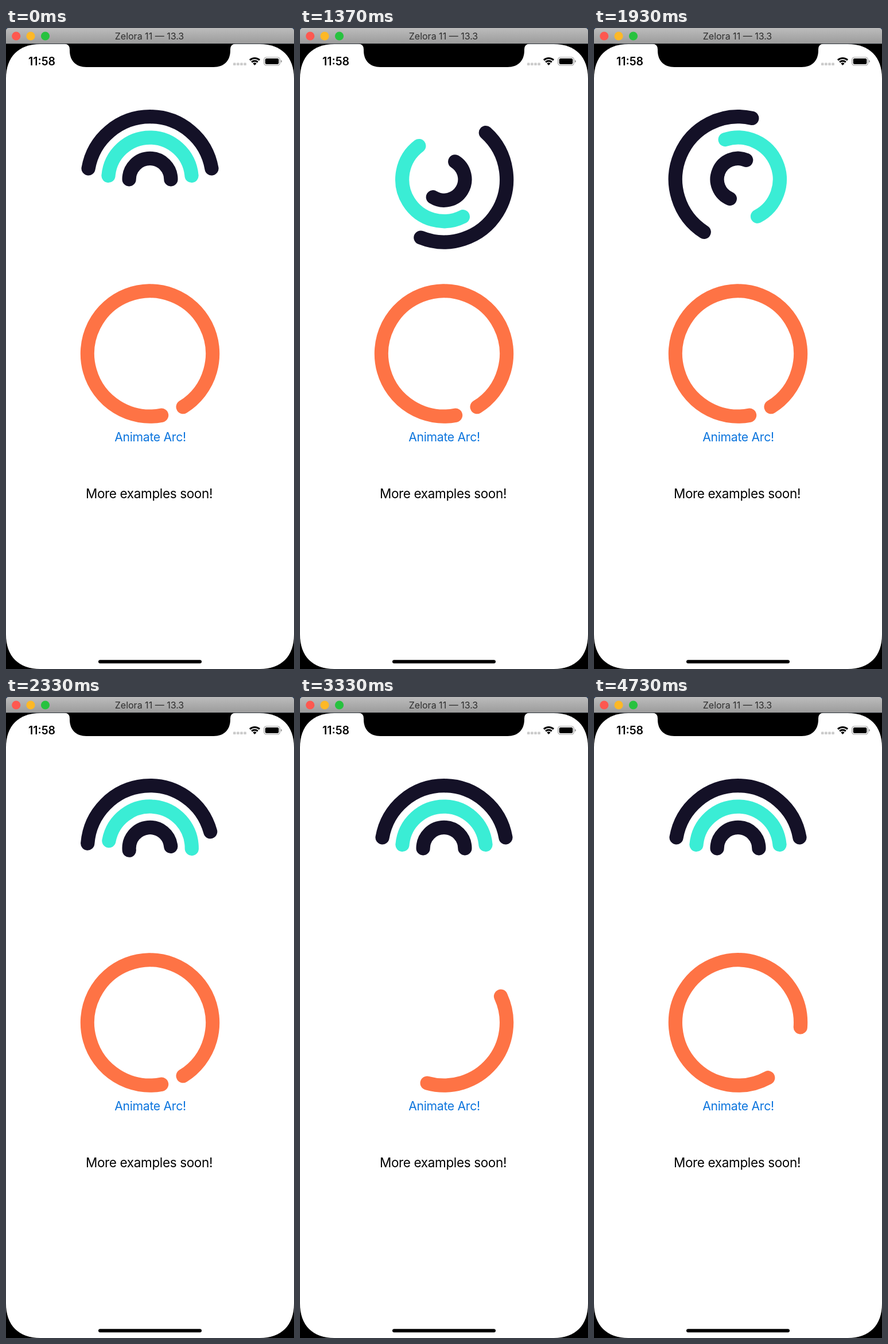
An HTML page for the animation above (4.76 s loop, 502 px wide and 1115 px high).

```html
<!DOCTYPE html>
<html lang="en">
<head>
<meta charset="utf-8">
<title>Arc examples</title>
<style>
  html, body { margin: 0; width: 100%; height: 100%; overflow: hidden; background: #000; }
  svg { display: block; width: 100%; height: 100%; }
  text { font-family: Inter, Roboto, sans-serif; text-anchor: middle; }
  .arc { fill: none; stroke-width: 24.25; stroke-linecap: round; }
</style>
</head>
<body>
<svg viewBox="0 0 502 1115">
  <defs>
    <linearGradient id="bar" x2="0" y2="1">
      <stop offset="0" stop-color="#bcbcbc"/>
      <stop offset="1" stop-color="#9b9b9b"/>
    </linearGradient>
  </defs>

  <!-- window bar -->
  <rect width="502" height="28" fill="#1d3557"/>
  <path d="M0 27.5V5Q0 0 5 0H497Q502 0 502 5V27.5Z" fill="url(#bar)"/>
  <circle cx="17.7" cy="14" r="7.6" fill="#fe5850"/>
  <circle cx="43" cy="14" r="7.6" fill="#fdb827"/>
  <circle cx="68.5" cy="14" r="7.6" fill="#27c23f"/>
  <text x="250" y="20" font-size="16" fill="#2e2e2e">Zelora 11 — 13.3</text>

  <!-- phone screen -->
  <rect y="27.5" width="502" height="1087.5"/>
  <path fill="#fff" d="M0 88C0 50 22 28 60 28H442C480 28 502 50 502 88V1055C502 1093 480 1115 442 1115H60C22 1115 0 1093 0 1055Z"/>
  <path d="M102 27.5Q111 28 111 37V39C111 57 122 68 140 68H362C380 68 391 57 391 39V37Q391 28 400 27.5Z"/>
  <rect x="161" y="1099.3" width="180" height="6" rx="3"/>

  <!-- status bar -->
  <text x="62.5" y="65" font-size="19.5" font-weight="600">11:58</text>
  <g fill="#cbcbcb">
    <rect x="396" y="60.5" width="4.6" height="4.6" rx="1.2"/>
    <rect x="402.1" y="60.5" width="4.6" height="4.6" rx="1.2"/>
    <rect x="408.2" y="60.5" width="4.6" height="4.6" rx="1.2"/>
    <rect x="414.3" y="60.5" width="4.6" height="4.6" rx="1.2"/>
  </g>
  <g fill="none" stroke="#000" stroke-width="3.1">
    <path d="M425 55.9A12.5 12.5 0 0 1 442 55.9"/>
    <path d="M428.2 59.3A7.8 7.8 0 0 1 438.8 59.3"/>
  </g>
  <path d="M433.5 65L430.4 61.7A4.5 4.5 0 0 1 436.6 61.7Z"/>
  <rect x="449.8" y="51" width="27.6" height="14" rx="4" fill="none" stroke="#9a9a9a" stroke-width="1.2"/>
  <rect x="451.8" y="53" width="23.6" height="10" rx="2.3"/>
  <path d="M479 55.8Q481.2 56.4 481.2 58T479 60.2Z" fill="#9a9a9a"/>

  <g id="arcs"></g>

  <text x="251.5" y="719" font-size="21.2" letter-spacing="-.3" fill="#0b74dd">Animate Arc!</text>
  <text x="249.5" y="818" font-size="22.5" letter-spacing="-.35">More examples soon!</text>
</svg>
<script>
const LOOP = 4760, CX = 251, TOP_Y = 263.3, RING_Y = 566.5;
const DARK = '#141127', TEAL = '#3aedd5', ORANGE = '#fe7345';
const layer = document.getElementById('arcs');

// radius, colour, start and end at rest in degrees, direction of spin
const bows = [
  { r: 109.1, color: DARK, from: 190, to: 350, dir: 1 },
  { r: 72.8, color: TEAL, from: 185, to: 355, dir: -1 },
  { r: 36.4, color: DARK, from: 180, to: 360, dir: 1 }
];

// start time, duration, first value, last value
const spin = [[608, 1888, 0, 360]];
const fill = [[2546, 944, 0.941, 0.327], [3577, 944, 0.327, 0.841]];

function addArc(color) {
  const p = document.createElementNS('http://www.w3.org/2000/svg', 'path');
  p.setAttribute('class', 'arc');
  p.setAttribute('stroke', color);
  return layer.appendChild(p);
}

function arcPath(cy, r, from, to) {
  const at = deg => {
    const a = deg * Math.PI / 180;
    return (CX + r * Math.cos(a)).toFixed(2) + ' ' + (cy + r * Math.sin(a)).toFixed(2);
  };
  const mid = (from + to) / 2;
  return `M${at(from)}A${r} ${r} 0 0 1 ${at(mid)}A${r} ${r} 0 0 1 ${at(to)}`;
}

// cubic-bezier(.42, 0, .58, 1)
function easeInOut(x) {
  if (x <= 0) return 0;
  if (x >= 1) return 1;
  let lo = 0, hi = 1, s = 0.5;
  for (let i = 0; i < 24; i++) {
    s = (lo + hi) / 2;
    const q = 1 - s;
    if (1.26 * s * q * q + 1.74 * s * s * q + s * s * s < x) lo = s; else hi = s;
  }
  return s * s * (3 - 2 * s);
}

function valueAt(steps, t) {
  let v = steps[0][2];
  for (const [start, time, a, b] of steps) {
    if (t >= start) v = a + (b - a) * easeInOut((t - start) / time);
  }
  return v;
}

for (const b of bows) b.node = addArc(b.color);
const ring = addArc(ORANGE);

function draw(t) {
  const turn = valueAt(spin, t);
  for (const b of bows) {
    const d = b.dir * turn;
    b.node.setAttribute('d', arcPath(TOP_Y, b.r, b.from + d, b.to + d));
  }
  // the tail runs half a turn while the head runs one and a half
  const u = valueAt(fill, t);
  ring.setAttribute('d', arcPath(RING_Y, 109.1, -90 + 180 * u, -90 + 540 * u));
}

const begin = performance.now();
function tick() {
  draw((performance.now() - begin) % LOOP);
  requestAnimationFrame(tick);
}
tick();
</script>
</body>
</html>
```
